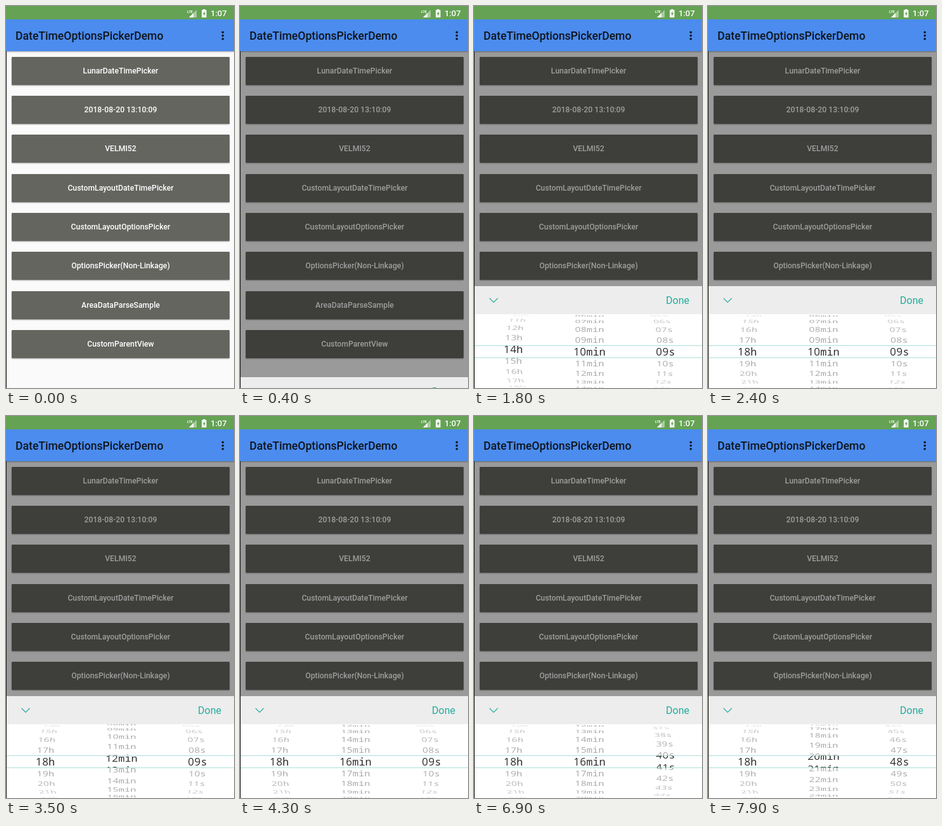
An HTML page with a canvas that plays this animation: 360x600 px, repeating every 8 s.

```html
<!DOCTYPE html>
<html lang="en">
<head>
<meta charset="utf-8">
<title>DateTimeOptionsPickerDemo</title>
<style>
  html, body { margin: 0; width: 100%; height: 100%; overflow: hidden; }
  body { position: relative; background: #fafafa; font-family: Roboto, "Noto Sans", sans-serif; }
  .status, .toolbar, .dim, .panel, .edge, .icons { position: absolute; left: 0; }
  .status { top: 0; width: 360px; height: 21px; background: #65a254; }
  .clock { position: absolute; left: 323px; top: 0; font: 500 13px/24px Roboto, sans-serif; color: #fff; }
  .toolbar {
    top: 21px; width: 360px; height: 50px; background: #4b8cee;
    box-shadow: 0 1px 2px rgba(0, 0, 0, .35);
  }
  .toolbar h1 { margin: 0 0 0 15px; font: 500 17.6px/52px Roboto, sans-serif; color: #10151c; white-space: nowrap; }
  .icons { top: 0; }
  .list { position: absolute; left: 9px; top: 79.6px; width: 344px; }
  .list div {
    height: 44px; margin-bottom: 17.33px; border-radius: 1px; background: #656560;
    box-shadow: 0 1px 2px rgba(0, 0, 0, .42);
    font: 500 12.26px/45px Roboto, sans-serif; color: #fff; text-align: center;
  }
  .dim { top: 71px; width: 360px; height: 529px; background: rgba(0, 0, 0, .385); }
  .panel { top: 440px; width: 360px; height: 162px; background: #fff; }
  .header { position: relative; height: 44px; background: #ededed; color: #24ad9d; }
  .done { position: absolute; left: 303px; top: 0; font: 400 16px/45px Roboto, sans-serif; }
  .header svg { position: absolute; left: 23px; top: 17px; }
  canvas { display: block; width: 360px; height: 118px; }
  .edge { top: 0; width: 1px; height: 600px; background: #1c1c1c; }
</style>
</head>
<body>
<div class="list">
  <div>LunarDateTimePicker</div>
  <div>2018-08-20 13:10:09</div>
  <div>VELMI52</div>
  <div>CustomLayoutDateTimePicker</div>
  <div>CustomLayoutOptionsPicker</div>
  <div>OptionsPicker(Non-Linkage)</div>
  <div>AreaDataParseSample</div>
  <div>CustomParentView</div>
</div>
<div class="dim" id="dim"></div>
<div class="panel" id="panel">
  <div class="header">
    <svg width="16" height="12"><path d="M1.5 2L8 8.5L14.5 2" fill="none" stroke="#24ad9d" stroke-width="1.1"/></svg>
    <span class="done">Done</span>
  </div>
  <canvas id="wheels"></canvas>
</div>
<div class="edge"></div>
<div class="toolbar"><h1>DateTimeOptionsPickerDemo</h1></div>
<div class="status"><span class="clock">1:07</span></div>
<svg class="icons" width="360" height="71">
  <path d="M301 6V18H289Z" fill="#fff" opacity=".45"/>
  <path d="M296 11V18H289Z" fill="#fff"/>
  <text x="286" y="10.5" font-family="Roboto, sans-serif" font-size="5.5" font-weight="700" fill="#fff">LTE</text>
  <path d="M311.3 5h3v1.3h2.2v11.7h-7.4V6.3h2.2z" fill="#fff"/>
  <path d="M313.5 8l-2.6 4.8h1.6v3.3l2.6-4.9h-1.6z" fill="#65a254"/>
  <g fill="#10151c">
    <circle cx="342.3" cy="41.2" r="1.8"/>
    <circle cx="342.3" cy="46.5" r="1.8"/>
    <circle cx="342.3" cy="51.8" r="1.8"/>
  </g>
</svg>

<script>
const LOOP = 8000, STEP = 100;
const RADIUS = 59, ITEM = Math.PI / 10, TEXT_H = 15.4, LINE_1 = 49.7, LINE_2 = 68.3;
const SIZE = 15.4, ADVANCE = SIZE * 0.6, STRETCH = 1.1, SQUASH = 0.8;
const INNER = '#2a2a2a', OUTER = '#a8a8a8';

const panel = document.getElementById('panel');
const dim = document.getElementById('dim');
const canvas = document.getElementById('wheels');
const ctx = canvas.getContext('2d');
const ratio = window.devicePixelRatio || 1;
canvas.width = 360 * ratio;
canvas.height = 118 * ratio;

const clamp = u => Math.min(1, Math.max(0, u));
const linear = u => u;
const inOut = u => (1 - Math.cos(Math.PI * u)) / 2;
const out = power => u => 1 - (1 - u) ** power;

// Each move: start ms, end ms, items travelled, easing
const wheels = [
  { unit: 'h', count: 24, x: 62, drift: 13.3, start: 13, moves: [[1700, 2400, 5, out(1.8)]] },
  { unit: 'min', count: 60, x: 182.3, drift: 0, start: 10,
    moves: [[2900, 4300, 6, inOut], [7700, 7900, 4.45, linear]] },
  { unit: 's', count: 60, x: 302.3, drift: -13.3, start: 9,
    moves: [[5400, 6200, 14, out(2.46)], [6400, 7500, 25, out(2)]] }
];

function position(wheel, t) {
  return wheel.moves.reduce((sum, [from, to, items, ease]) =>
    sum + items * ease(clamp((t - from) / (to - from))), wheel.start);
}

const isDigit = c => c >= '0' && c <= '9';

function setFont(c) {
  ctx.font = isDigit(c) ? `${SIZE}px "Open Sans", sans-serif` : `${SIZE}px "Noto Sans Mono", monospace`;
}

// x is the middle of the text cells
function paint(text, x, y, { inner = false, scale = 1, skew = 0, alpha = 1, from = 0, to = 118 }) {
  const stretch = inner ? STRETCH : 1;
  ctx.save();
  ctx.beginPath();
  ctx.rect(0, from, 360, to - from);
  ctx.clip();
  ctx.globalAlpha = alpha;
  ctx.fillStyle = inner ? INNER : OUTER;
  ctx.textAlign = 'center';
  ctx.translate(x, y);
  ctx.scale(stretch, scale);
  ctx.transform(1, 0, skew, 1, 0, 0);
  [...text].forEach((c, i) => {
    setFont(c);
    ctx.fillText(c, (i - (text.length - 1) / 2) * ADVANCE, 0);
  });
  ctx.restore();
}

function drawItem(wheel, text, angle) {
  const { x, drift } = wheel;
  const cos = Math.cos(angle);
  const top = RADIUS + RADIUS * Math.sin(angle) - cos * TEXT_H / 2;
  const bottom = top + TEXT_H;
  const outerScale = cos * SQUASH;
  const outerY = top + TEXT_H * outerScale;
  const innerY = top + (TEXT_H - 2) * cos;

  if (top >= LINE_1 && bottom <= LINE_2) {
    paint(text, x, top + TEXT_H - 2, { inner: true });
  } else if (top <= LINE_1 && bottom >= LINE_1) {
    paint(text, x, outerY, { scale: outerScale, to: LINE_1 });
    paint(text, x, innerY, { inner: true, scale: cos, from: LINE_1 });
  } else if (top <= LINE_2 && bottom >= LINE_2) {
    paint(text, x, innerY, { inner: true, scale: cos, to: LINE_2 });
    paint(text, x, outerY, { scale: outerScale, from: LINE_2 });
  } else {
    const bend = (Math.abs(angle) / (Math.PI / 2)) ** 2.2;
    paint(text, x + drift * bend, outerY, {
      scale: outerScale,
      skew: Math.sign(drift) * Math.sign(angle) * 0.5 * bend,
      alpha: drift ? 1 - bend : 1
    });
  }
}

function drawWheels(t) {
  ctx.setTransform(ratio, 0, 0, ratio, 0, 0);
  ctx.clearRect(0, 0, 360, 118);
  ctx.fillStyle = 'rgba(36, 173, 157, .38)';
  ctx.fillRect(0, 49, 360, 1);
  ctx.fillRect(0, 68, 360, 1);
  for (const wheel of wheels) {
    const pos = position(wheel, t);
    for (let k = Math.ceil(pos - 5); k <= pos + 5; k++) {
      const n = (k + wheel.count) % wheel.count;
      drawItem(wheel, String(n).padStart(2, '0') + wheel.unit, (k - pos) * ITEM);
    }
  }
}

let shown = -1;
function frame(now) {
  const t = Math.floor((now % LOOP) / STEP) * STEP;
  if (t !== shown) {
    shown = t;
    const open = t >= 400;
    dim.style.visibility = panel.style.visibility = open ? 'visible' : 'hidden';
    const slide = inOut(clamp((t - 310) / 430));
    panel.style.transform = `translateY(${Math.round(160 * (1 - slide))}px)`;
    drawWheels(t);
  }
  requestAnimationFrame(frame);
}
frame(performance.now());
</script>
</body>
</html>
```
